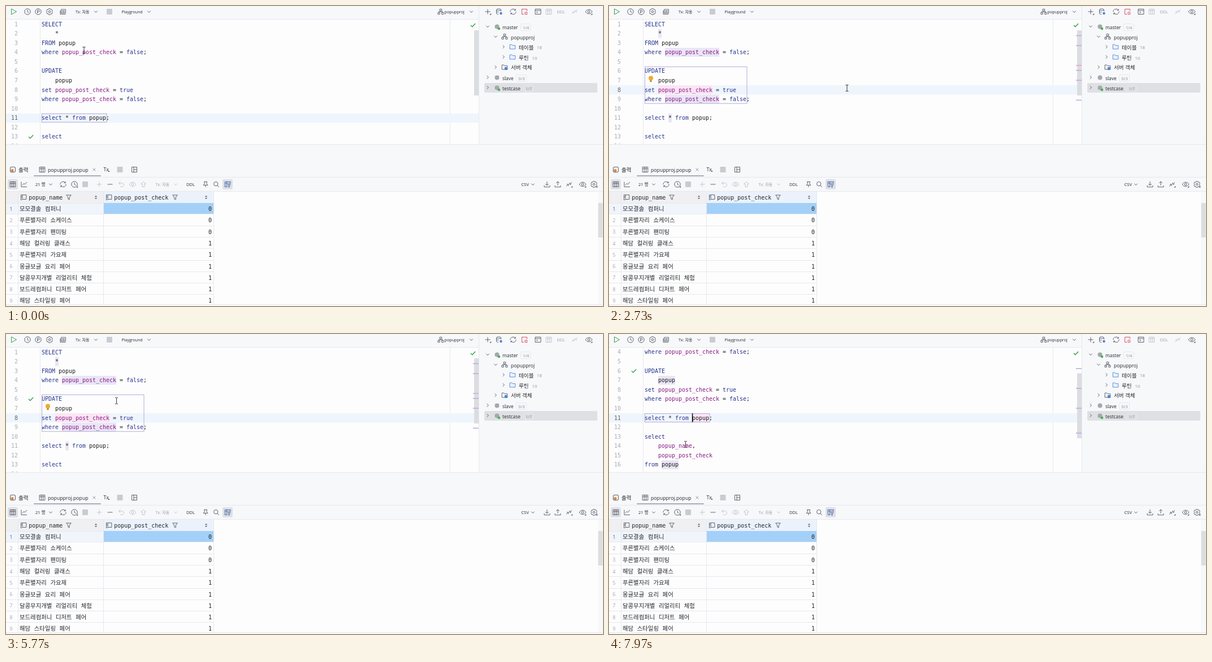
Write an HTML page that moves like this. It is 1056 px wide and 530 px high and loops after 8 s.

```html
<!DOCTYPE html>
<html lang="ko">
<head>
<meta charset="utf-8">
<title>SQL console</title>
<style>
html, body { margin: 0; width: 100%; height: 100%; overflow: hidden; background: #f7f8fa; }
svg { display: block; }
text { white-space: pre; font-family: "Open Sans", "Noto Sans CJK KR", "Noto Sans CJK", sans-serif; }
.mono { font-family: "DejaVu Sans Mono", "Noto Sans Mono", monospace; font-size: 9.97px; }
.cell { font-family: "Noto Sans CJK KR", "Noto Sans CJK", sans-serif; font-size: 10.4px; word-spacing: 3.7px; }
</style>
</head>
<body>
<svg id="stage" width="1056" height="530" viewBox="0 0 1056 530"></svg>
<script>
const INK = '#5f636e', PALE = '#c4c7d0', LINE = '#e6e8ee', LILAC = '#e9e5f5', PINK = '#fbe5f4';
const GREEN = '#3fa657', PAPER = '#fdfdfd';
const LOOP = 8000, CLICK = 650, RECLICK = 7150;

// Drawing helpers
const rect = (x, y, w, h, fill, extra = '') =>
  `<rect x="${x}" y="${y}" width="${w}" height="${h}" fill="${fill}" ${extra}/>`;
const text = (x, y, s, size = 8.5, fill = '#25272c', extra = '') =>
  `<text x="${x}" y="${y}" font-size="${size}" fill="${fill}" ${extra}>${s}</text>`;
const mono = (x, y, s, fill = '#222', extra = '') =>
  `<text class="mono" x="${x}" y="${y}" fill="${fill}" ${extra}>${s}</text>`;
const group = (id, body) => `<g id="${id}">${body}</g>`;
const hline = (x, y, w) => rect(x, y, w, 1, LINE);
const vline = (x, y, h) => rect(x, y, 1, h, LINE);

const shapes = {
  play: 'M-4.5-5L4.5 0L-4.5 5Z',
  clock: 'M-5.2 0a5.2 5.2 0 1 0 10.4 0a5.2 5.2 0 1 0-10.4 0M0-3.2V.3L2.6 1.6',
  param: 'M-5.2 0a5.2 5.2 0 1 0 10.4 0a5.2 5.2 0 1 0-10.4 0M-1.4 3V-2.7H.4a1.6 1.6 0 0 1 0 3.4H-1.4',
  gear: 'M-1.4-5.3H1.4L2.1-3.7L4-4L5.3-1.6L4.2 0L5.3 1.6L4 4L2.1 3.7L1.4 5.3H-1.4L-2.1 3.7L-4 4L-5.3 1.6L-4.2 0L-5.3-1.6L-4-4L-2.1-3.7ZM-1.8 0a1.8 1.8 0 1 0 3.6 0a1.8 1.8 0 1 0-3.6 0',
  screen: 'M-3.5-4H4.5V2.5H-3.5ZM-5-2V4.5H4.5M-2-1.5H3M-2 .5H3',
  down: 'M-2.7-1.3L0 1.5L2.7-1.3',
  right: 'M-1.3-2.7L1.5 0L-1.3 2.7',
  schema: 'M-1.8-4.5H1.8V-1.3H-1.8ZM-5 1.3H-1.8V4.5H-5ZM1.8 1.3H5V4.5H1.8ZM0-1.3V0M-3.4 1.3V0H3.4V1.3',
  plus: 'M-4.5 0H4.5M0-4.5V4.5',
  minus: 'M-4.5 0H4.5',
  db: 'M-4.5-3.5C-4.5-5.4 3.5-5.4 3.5-3.5C3.5-1.6-4.5-1.6-4.5-3.5V3C-4.5 4-3 4.6-1 4.7M3.5-3.5V-.5M-4.5-.3C-4 1-2 1-.5 1',
  refresh: 'M-5 .5A5 4.6 0 0 1 4-2.8M4.2-5V-2.5H1.6M5-.5A5 4.6 0 0 1-4 2.8M-4.2 5V2.5H-1.6',
  stop: 'M4.5-1V-4.5H-4.5V4.5H-1M1 1H4.7V4.7H1Z',
  console: 'M-5-4.5H5V4.5H-5ZM-5-2H5M-2.5 0L-.5 1.3L-2.5 2.6',
  table: 'M-4.8-4.5H4.8V4.5H-4.8ZM-4.8-1.6H4.8M-1.6-4.5V4.5M1.6-4.5V4.5',
  arrows: 'M-5 3.5L-1 0M-1 3V0H-4M5-3.5L1 0M1-3V0H4',
  eye: 'M-5.8 0C-3.4-5 3.4-5 5.8 0C3.4 5-3.4 5-5.8 0ZM-2 0a2 2 0 1 0 4 0a2 2 0 1 0-4 0',
  folder: 'M-4.8-3.8H-1.2L0-2.3H4.8V4H-4.8Z',
  close: 'M-2.5-2.5L2.5 2.5M2.5-2.5L-2.5 2.5',
  layout: 'M-4.5-4.5H4.5V4.5H-4.5ZM-1-4.5V4.5M-1 0H4.5',
  chart: 'M-5-4.5V4.5H5M-3 1.5L-.5-1.5L1.5 0L5-4',
  undo: 'M-1.8-4.8L-4.5-2L-1.8 .8M-4.5-2H1.3C5.5-2 5.5 4.3 1.3 4.3H-2',
  up: 'M0-4.8L4.5-.5H2V4.5H-2V-.5H-4.5Z',
  pin: 'M-3-4.5H3M-2-4.5V-.5L-4 1.5H4L2-.5V-4.5M0 1.5V5',
  search: 'M-4.5-.8a3.7 3.7 0 1 0 7.4 0a3.7 3.7 0 1 0-7.4 0M1.8 2L4.8 5',
  panel: 'M5-1V-4.5H-4.8V4.5H-.5M-4.8-1.8H5M-1.8-4.5V4.5M0 .6H5L3.2 2.6V5H1.8V2.6Z',
  load: 'M0-5V2M-2.8-.8L0 2L2.8-.8M-5 2V4.8H5V2',
  save: 'M0 2V-5M-2.8-2.2L0-5L2.8-2.2M-5 2V4.8H5V2',
  funnel: 'M-4.3-4H4.3L1.2 0V4L-1.2 3V0Z',
  sort: 'M-1.8-1.2L0-3L1.8-1.2ZM-1.8 1.2L0 3L1.8 1.2Z',
  column: 'M-2-4.3H4.8V3.5H-2ZM-2-4.3H-4.5V4.5H-2.5M-4.5-1H-2',
  check: 'M-4 0L-1.2 2.8L4.2-3',
  corner: 'M0 0V-2.2L-2.2 0Z',
};
const icon = (name, x, y, color = INK, fill = 'none', width = 1) =>
  `<path transform="translate(${x} ${y})" d="${shapes[name]}" fill="${fill}" stroke="${color}" stroke-width="${width}" stroke-linejoin="round"/>`;
const icons = (y, list) => list.map(([name, x, color]) => icon(name, x, y, color)).join('');
const corners = (y, xs) => xs.map(x => icon('corner', x + 6, y + 5.5, INK, INK, .5)).join('');
const block = (x, y) => rect(x - 5, y - 5, 10, 10, '#c9cbd2', 'rx="1"');
const dot = (x, y, r, color) => `<circle cx="${x}" cy="${y}" r="${r}" fill="${color}"/>`;

// Editor geometry
const PITCH = 16.58, LEFT = 63;
const rowY = n => 32 + PITCH * (n - 1);
const colX = c => LEFT + 6 * c;
const code = ['SELECT', '    *', 'FROM popup', 'where popup_post_check = false;', '', 'UPDATE', '    popup',
  'set popup_post_check = true', 'where popup_post_check = false;', '', 'select * from popup;', '', 'select',
  '    popup_name,', '    popup_post_check', 'from popup'];

function codeLine(s, i) {
  const indent = s.search(/\S|$/);
  const body = s.trim().replace(/\w+/g, w => {
    const color = /_/.test(w) ? '#8a1a86' : w === 'popup' ? '#1c1c1c' : '#27348f';
    return `<tspan fill="${color}">${w}</tspan>`;
  });
  return mono(colX(indent), rowY(i + 1) + 3.5, body);
}
const numbers = code.map((s, i) =>
  mono(21, rowY(i + 1) + 3.5, i + 1, '#a9adb8', `id="num${i + 1}" text-anchor="end"`)).join('');
const mark = (line, col, len, color = LILAC) =>
  rect(colX(col), rowY(line) - 7.8, 6 * len, 15.6, color);
const frame = (from, to, len) =>
  rect(63.5, rowY(from) - 7.5, 6 * len + 0.5, PITCH * (to - from) + 15, 'none', 'stroke="#b3acd6"');
const stripes = lines => lines.map(n =>
  rect(826, 34 + 8.77 * n, 10, 1.6, n === 8 ? '#dfa9cf' : '#c0abe0')).join('');

// The popup's sheet lies under the code, its border above it
const popupBox = (fill, stroke) =>
  rect(136, 156.5, 261.5, 84, fill, `rx="5" stroke="${stroke}" stroke-width="1.3"`);
const sheet = '<filter id="shade" x="-30%" y="-60%" width="160%" height="240%"><feGaussianBlur stdDeviation="12"/></filter>' +
  group('sheet', rect(138, 170, 258, 82, '#000', 'rx="6" opacity=".27" filter="url(#shade)"') + popupBox(PAPER, 'none'));

function editor() {
  return rect(0, 23, 836, 221, PAPER) + vline(785, 23, 221) + sheet +
    '<clipPath id="view"><rect y="23" width="836" height="221"/></clipPath><g clip-path="url(#view)">' +
    group('scroller',
      group('row', rect(0, -8, 836, 16.3, '#eff5fc')) +
      group('usesB', mark(2, 4, 1) + mark(4, 6, 16) + mark(8, 4, 16, PINK) + mark(9, 6, 16) + mark(11, 7, 1) + mark(15, 4, 16)) +
      group('usesC', mark(7, 4, 5) + mark(11, 14, 5, PINK) + mark(16, 5, 5)) +
      numbers + code.map(codeLine).join('') +
      group('boxSelect', frame(11, 11, 19)) + group('boxUpdate', frame(6, 9, 30)) +
      group('bulb', dot(74, 127.6, 4, '#f2a92c') + rect(72.3, 131, 3.4, 3.2, '#b98a3a', 'rx="1"')) +
      group('tick', icon('check', 44, 0, GREEN, 'none', 1.5)) +
      group('caret', rect(-0.2, -7.8, 1.6, 15.6, '#111'))) +
    '</g>' + vline(60, 23, 221) +
    group('thumb', rect(828, 43, 8, 115, '#dcdde1')) +
    group('stripesB', stripes([2, 4, 8, 9, 11, 15])) + group('stripesC', stripes([3, 7, 11, 16])) +
    icon('check', 826, 34, GREEN, 'none', 1.6) + vline(836, 0, 244) + hline(0, 23, 836) + hline(0, 244, 1056);
}

function topBar() {
  return icon('play', 14, 10, '#3f9c55') +
    icons(10, [['clock', 38], ['param', 57], ['gear', 77], ['screen', 101], ['down', 159], ['down', 253],
      ['schema', 769], ['down', 823], ['plus', 852], ['db', 872], ['refresh', 897], ['stop', 917, '#d9506b'],
      ['console', 941], ['table', 960, PALE], ['arrows', 1006, PALE], ['eye', 1031]]) +
    corners(10, [852, 1031]) + dot(875.5, 13, 2.2, '#4b83d6') + block(183, 10) +
    text(123, 13, 'Tx: 자동', 7.2) + text(204.5, 13, 'Playground', 7) + text(775.5, 13, 'popupproj', 7.2) +
    text(974.5, 13.3, 'DDL', 7.2, '#9a9ea8');
}

function tree() {
  const badge = (x, y, s) => rect(x - 3.5, y - 6, 17.5, 12, 'none', `stroke="${LINE}" rx="2"`) +
    text(x, y + 3, s, 7.4, '#858993');
  const source = (y, name, bx, count, live) => dot(868.5, y - .5, 4, '#a3a8b1') +
    (live ? dot(872, y + 3, 2.2, '#46b04a') : '') + text(878, y + 3.5, name, 8.4) + badge(bx, y + .5, count);
  const folder = (x, y) => icon('folder', x, y, '#5b8fdc', '#eaf1fd');
  return rect(846, 136, 200, 17, '#dfe0e4', 'rx="2"') +
    icon('down', 852, 36) + source(37, 'master', 914, '1/4', true) +
    icon('down', 866, 54) + icon('schema', 882, 54) + text(893, 58.5, 'popupproj', 8.6) +
    icon('right', 880, 72) + folder(896, 72) + text(907, 76.5, '테이블', 9.6) + text(939, 76.3, '18', 7.8, '#8f939d') +
    icon('right', 866, 108) + icon('folder', 882, 108) + rect(882, 108, 5, 5, '#4b83d6') + text(893, 112.3, '서버 객체', 9.5) +
    icon('right', 880, 90) + folder(896, 90) + text(907, 94.5, '루틴', 9.6) + text(930.5, 94.5, '10', 7.8, '#8f939d') +
    icon('right', 852, 126) + source(127, 'slave', 906.5, '0/3', false) +
    icon('right', 852, 144) + source(145, 'testcase', 919, '1/7', true);
}

function resultBars() {
  return rect(7.5, 284.5, 9, 9, 'none', `stroke="${INK}" rx="1.5"`) + dot(11, 290.5, 2.6, '#e0873f') +
    text(22, 292.8, '출력', 9.6) + icon('table', 64, 289) + text(74, 293, 'popupproj.popup', 8.7) +
    icon('close', 156, 289, '#9a9ea8') + text(172.5, 292, 'Tx', 8.8) + rect(181, 291, 2, 2, INK) +
    block(201.5, 289) + icon('layout', 227, 289) + hline(0, 302, 1056) +
    rect(49, 299, 119, 2, '#a9adb9', 'rx="1"') +
    rect(3, 306, 18, 18, '#dfe0e5', 'rx="3"') + rect(383, 306, 18, 18, '#dfe0e5', 'rx="3"') +
    icons(315, [['table', 12], ['chart', 32], ['down', 79], ['refresh', 101], ['clock', 121], ['plus', 165, PALE],
      ['minus', 184], ['undo', 204, PALE], ['eye', 224, PALE], ['up', 243, PALE], ['down', 300, PALE], ['pin', 353],
      ['search', 372], ['panel', 392, '#4b6fae'], ['down', 932], ['load', 957], ['save', 976], ['arrows', 996],
      ['eye', 1020], ['gear', 1040]]) +
    corners(315, [121, 996, 1020, 1040]) +
    block(140, 315) + text(52, 318, '21 행', 7.5) + text(264.5, 318, 'Tx: 자동', 7.2, '#9a9ea8') +
    text(319, 318, 'DDL', 7.5) + text(911.5, 318, 'CSV', 7.6);
}

function grid() {
  const names = ['모모결솔 컴퍼니', '푸른별자리 쇼케이스', '푸른별자리 팬미팅', '해담 컬러링 클래스', '푸른별자리 가요제',
    '몽글보글 요리 페어', '달콩무지개별 리얼리티 체험', '보드레컴퍼니 디저트 페어', '해담 스타일링 페어'];
  const step = 20.28;
  const rows = names.map((name, i) => {
    const y = 358.3 + step * i;
    return text(9, y + 3.5, i + 1, 8.6, i ? '#a0a4ae' : '#555963', 'text-anchor="middle"') +
      `<text class="cell" x="24" y="${y + 3.8}" fill="#26282d">${name}</text>` +
      mono(364, y + 3.8, i < 3 ? 0 : 1, '#222', 'text-anchor="end"') + hline(0, Math.round(y + step / 2) - 1, 367);
  }).join('');
  const head = (x, name, fx, sx) => icon('column', x, 338) + mono(x + 9.3, 341.5, name, '#25272c') +
    icon('funnel', fx, 338) + icon('sort', sx, 338, INK, INK, .5);
  return rect(0, 328, 1056, 200, PAPER) + rect(0, 328, 172, 20, '#f0f0f2') + rect(172, 328, 196, 20, '#ebf2fb') +
    rect(0, 348, 172, 20, '#f0f5fc') + rect(173, 348, 194, 20, '#a3d0f8') + rows +
    vline(21, 328, 200) + vline(172, 328, 200) + vline(367, 328, 200) + hline(0, 348, 172) + hline(0, 327, 1056) +
    head(31, 'popup_name', 111, 159) + head(182, 'popup_post_check', 299, 354) +
    rect(1047, 328, 9, 200, '#f7f8fa') + rect(1047.5, 348, 8, 61, '#dcdde1') + rect(0, 527, 1056, 1, LINE);
}

const overlay = group('border', popupBox('none', '#b4b6bd')) +
  group('pointer', '<path d="M-2.5-5.5H-1Q0-5.5 0-4.5Q0-5.5 1-5.5H2.5M0-4.5V4.5M-2.5 5.5H-1Q0 5.5 0 4.5Q0 5.5 1 5.5H2.5" fill="none" stroke="#333"/>');

document.getElementById('stage').innerHTML =
  rect(0, 0, 1056, 530, '#f7f8fa') + editor() + topBar() + tree() + resultBars() + grid() + overlay;

// Motion
const el = {};
document.querySelectorAll('[id]').forEach(node => el[node.id] = node);
const show = (id, on) => el[id].style.display = on ? '' : 'none';
const move = (id, x, y) => el[id].setAttribute('transform', `translate(${x} ${y})`);
const ease = k => k * k * (3 - 2 * k);

// [time, x, y]
const path = [[0, 138, 78], [120, 138, 78], [560, 136.5, 149], [1150, 136.5, 149], [1700, 421, 145], [4250, 421, 145],
  [4720, 286, 97], [5250, 286, 97], [5850, 191, 119], [6550, 191, 119], [7050, 149, 149], [7350, 149, 149],
  [7850, 135.5, 195], [LOOP, 135.5, 195]];

function pointerAt(t) {
  const i = path.findIndex(p => p[0] > t);
  const [t0, x0, y0] = path[i - 1], [t1, x1, y1] = path[i];
  const k = ease((t - t0) / (t1 - t0));
  return [x0 + (x1 - x0) * k, y0 + (y1 - y0) * k];
}

function caretOn(t) {
  if (t < CLICK) return false;
  if (t < 2000) return (t - CLICK) % 1000 < 500;
  if (t < 3000) return false;
  if (t < RECLICK) return t % 1000 < 500;
  return t < RECLICK + 500 || t > 7900;
}

function render(t) {
  const first = t < CLICK, last = t >= RECLICK, middle = !first && !last;
  const line = middle ? 8 : 11;
  const scroll = 3 * PITCH * ease(Math.min(1, Math.max(0, (t - 6186) / 250)));
  const outlined = t >= 950 && !last;
  const popup = t >= 2000 && t < 2700;

  move('scroller', 0, -scroll);
  move('thumb', 0, scroll * .53);
  move('row', 0, rowY(line));
  move('caret', colX(middle ? 12 : 14), rowY(line));
  move('tick', 0, rowY(t < 2800 ? 13 : 6));
  move('pointer', ...pointerAt(t));

  show('usesB', middle);
  show('usesC', last);
  show('stripesB', t >= 1050 && !last);
  show('stripesC', last);
  show('boxSelect', !outlined);
  show('boxUpdate', outlined);
  show('bulb', t >= 1500 && !last);
  show('caret', caretOn(t));
  show('sheet', popup);
  show('border', popup);
  show('tick', t < 2700 || t >= 2800);
  for (const n of [8, 11]) el['num' + n].setAttribute('fill', n === line ? '#5c606b' : '#a9adb8');
}

const start = performance.now();
function tick() {
  render((performance.now() - start) % LOOP);
  requestAnimationFrame(tick);
}
render(0);
requestAnimationFrame(tick);
</script>
</body>
</html>
```
